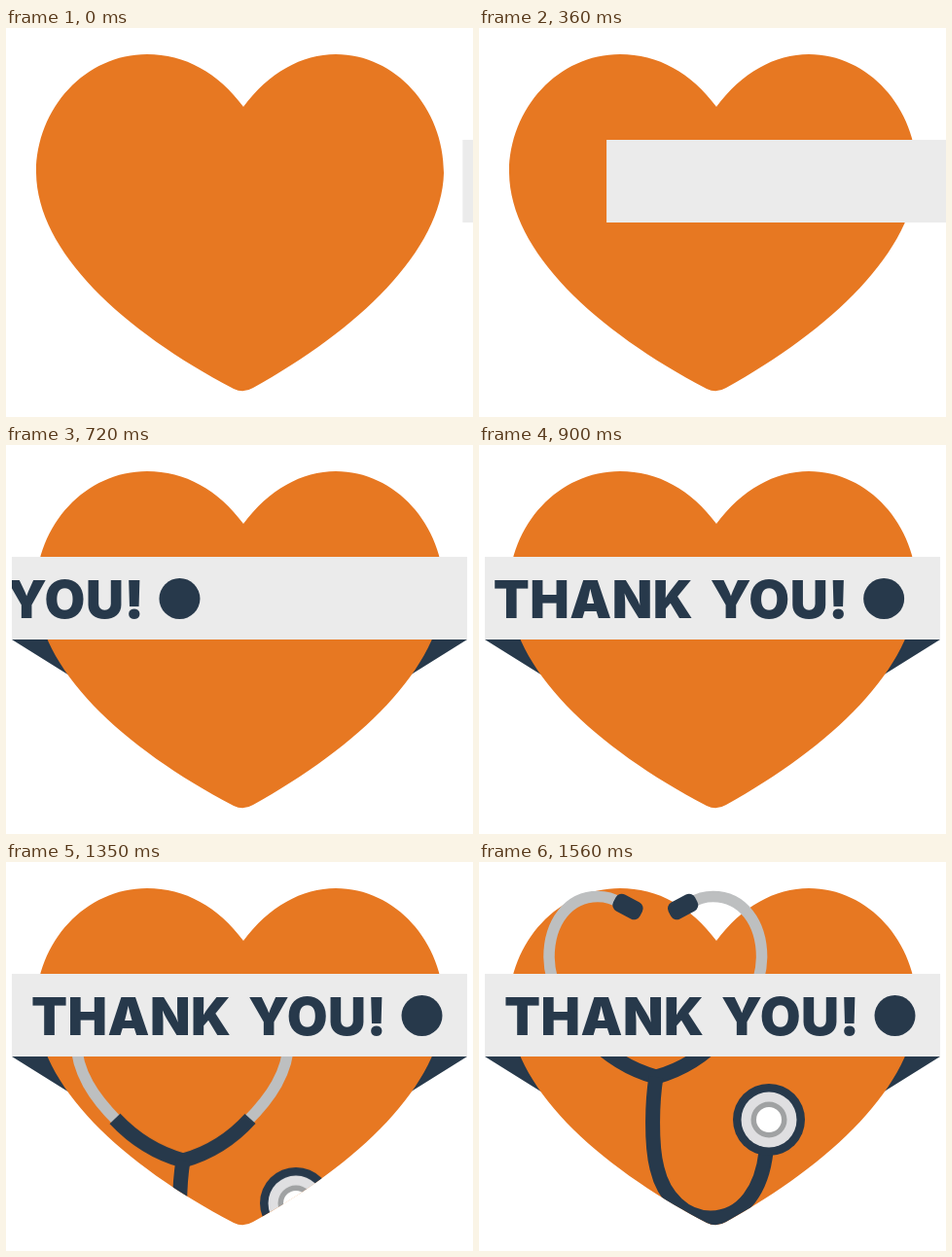
An HTML page that plays this animation: 480 px wide and 400 px high, repeating every 3600 ms.

```html
<!DOCTYPE html>
<html lang="en">
<head>
<meta charset="utf-8">
<title>Thank you</title>
<style>
  :root { --orange: #e77822; --navy: #27394b; --paper: #ebebeb; --steel: #bdbfc0; }
  html, body { margin: 0; width: 100%; height: 100%; overflow: hidden; background: #fff; }
  svg { display: block; width: 100vw; height: 100vh; }

  .banner, .fold, .message, .scope { animation: 3600ms linear infinite both; }
  .banner  { animation-name: banner; }
  .fold    { animation-name: fold; transform-origin: 0 200px; }
  .message { animation-name: message; }
  .scope   { animation-name: scope; }

  @keyframes banner {
    0%     { transform: translateX(464px); animation-timing-function: cubic-bezier(.3, .2, .7, .7); }
    10%    { transform: translateX(126px); animation-timing-function: cubic-bezier(.3, .35, .7, 1); }
    14.44%, 100% { transform: none; }
  }
  @keyframes fold {
    0%, 13.9%  { transform: scaleY(0); }
    15%, 100%  { transform: scaleY(1); }
  }
  @keyframes message {
    0%, 14.8%   { transform: translateX(-448px); animation-timing-function: cubic-bezier(.333, 0, .667, 1); }
    26.1%, 100% { transform: none; }
  }
  @keyframes scope {
    0%, 29.9%   { transform: translateY(346px); animation-timing-function: cubic-bezier(.333, 0, .667, 1); }
    41.2%, 100% { transform: none; }
  }

  .tube { fill: none; stroke: var(--navy); stroke-width: 15; }
  .steel { fill: none; stroke: var(--steel); stroke-width: 11.5; }
  .navy { fill: var(--navy); }
  text { font: 900 54px Inter, sans-serif; letter-spacing: .5px; fill: var(--navy); }
</style>
</head>
<body>
<svg viewBox="0 0 480 400">
  <defs>
    <path id="heart" d="M244 81C218 46 184 27 145 27C82 27 31 82 31 149C32 230 120 311 234 371
      Q244 376 254 370C361 311 448 229 450 149C450 82 400 27 339 27C304 27 270 46 244 81Z"/>
    <clipPath id="scopeArea">
      <use href="#heart"/>
      <rect width="480" height="200"/>
    </clipPath>
    <clipPath id="bannerArea"><rect x="6" y="115" width="468" height="85"/></clipPath>
    <g id="earpiece">
      <path class="steel" d="M145 42C137 37 130 35.5 122 35.5C92 35.5 72 62 72 98C72.5 130 90 156 115 181"/>
      <rect class="navy" x="-15.5" y="-9.5" width="31" height="19" rx="7" transform="translate(153 46) rotate(28)"/>
    </g>
  </defs>

  <path class="fold navy" d="M6 200H70V240ZM474 200H410V240Z"/>
  <use href="#heart" fill="var(--orange)"/>

  <g clip-path="url(#scopeArea)">
    <g class="scope">
      <use href="#earpiece"/>
      <use href="#earpiece" transform="matrix(-1 0 0 1 362.6 0)"/>
      <path class="tube" stroke-linejoin="round" stroke-width="16" d="M112 178Q142 210 182 221Q222 210 251 178"/>
      <path class="tube" d="M182 221C178 245 176.5 290 183 315C190 345 212 366 238 366C272 366 291 335 295 298"/>
      <g transform="translate(298 265)">
        <circle class="navy" r="37"/>
        <circle r="28.5" fill="#dfdfe1"/>
        <circle r="18.5" fill="#a0a2a3"/>
        <circle r="13" fill="#fff"/>
      </g>
    </g>
  </g>

  <rect class="banner" x="6" y="115" width="468" height="85" fill="var(--paper)"/>
  <g clip-path="url(#bannerArea)">
    <g class="message">
      <text y="178"><tspan x="26">THANK</tspan><tspan x="249">YOU!</tspan></text>
      <circle class="navy" cx="427.5" cy="158" r="21"/>
    </g>
  </g>
</svg>
</body>
</html>
```
